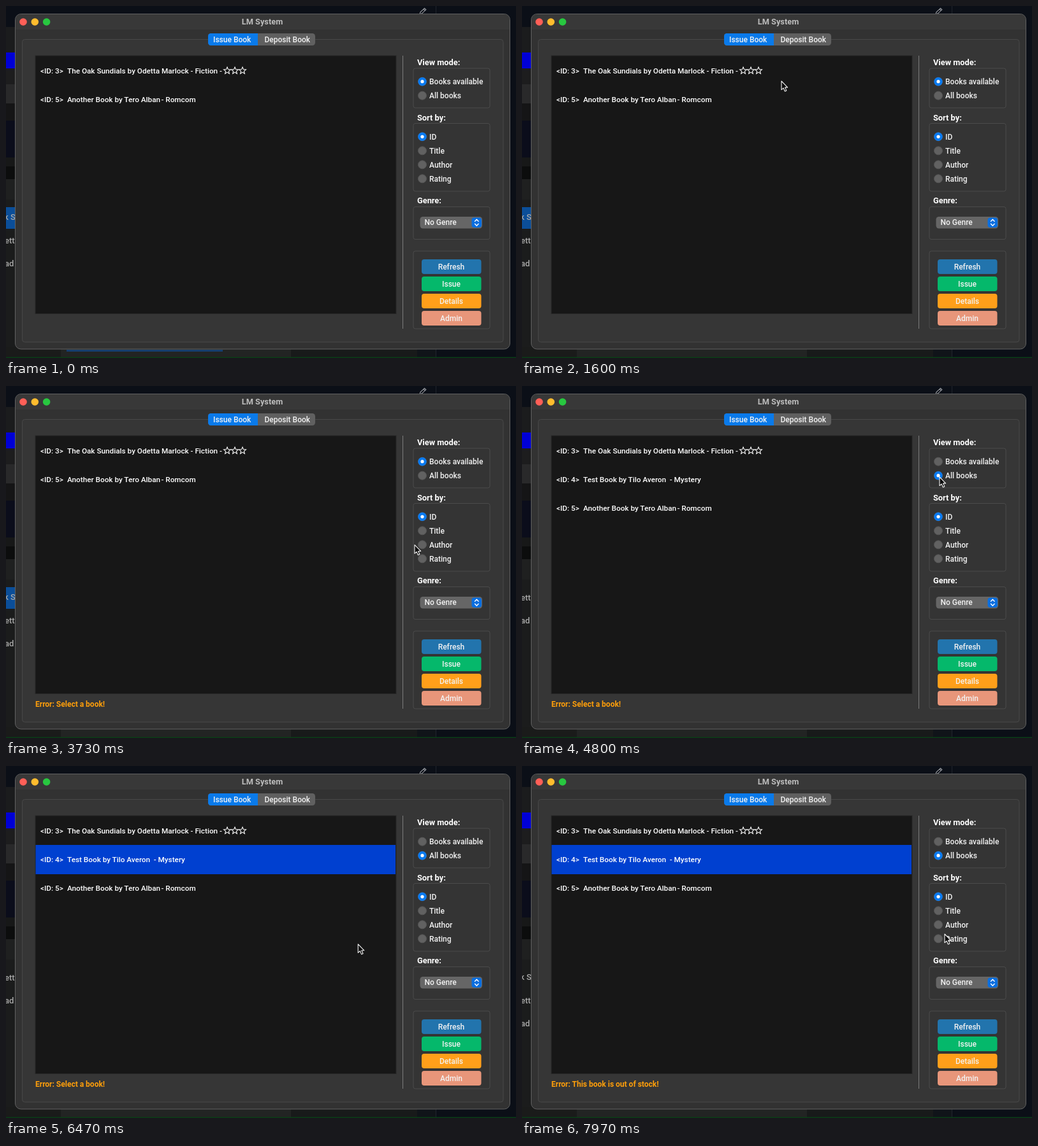
An HTML page for the animation above (8000 ms loop, 800 by 553 pixels).

```html
<!DOCTYPE html>
<html lang="en">
<head>
<meta charset="utf-8">
<title>LM System</title>
<style>
html, body { margin: 0; width: 100%; height: 100%; overflow: hidden; background: #0b0f17; }
svg { display: block; width: 800px; height: 553px; }
text { font-family: Roboto, Arial, sans-serif; font-size: 12px; font-weight: 500; fill: #f2f2f2; white-space: pre; }
.list text { font-size: 11.75px; fill: #fff; }
.head { font-size: 12.8px; font-weight: 700; fill: #fff; }
.error { font-weight: 700; fill: #ff9f0a; }
.mid { text-anchor: middle; }
.back text { font-size: 13px; fill: #a9a9a9; }
</style>
</head>
<body>
<svg id="stage" viewBox="0 0 800 553" xmlns="http://www.w3.org/2000/svg"></svg>
<script>
const LOOP = 8000;
const T = { line: 150, error: 3200, shift: 4370, all: 4670, stock: 7290, back: 7500 };

const rect = (x, y, x2, y2, fill, more = '') =>
  `<rect x="${x}" y="${y}" width="${x2 - x}" height="${y2 - y}" fill="${fill}" ${more}/>`;
const text = (x, yMid, s, more = '') =>
  `<text x="${x}" y="${yMid + 4.2}" ${more}>${s.replace(/</g, '&lt;').replace(/>/g, '&gt;')}</text>`;
const group = (id, body, more = '') => `<g id="${id}" ${more}>${body}</g>`;

const star = (cx, cy) => {
  const pts = Array.from({ length: 10 }, (_, i) => {
    const r = i % 2 ? 2.5 : 5.7, a = (i * 36 - 90) * Math.PI / 180;
    return (cx + r * Math.cos(a)).toFixed(2) + ',' + (cy + r * Math.sin(a)).toFixed(2);
  });
  return `<polygon points="${pts.join(' ')}" fill="none" stroke="#fff" stroke-width="1.1"/>`;
};

function backdrop() {
  const left = [
    [33, 73, '#1b1c1d'], [73, 98, '#0000d6'], [98, 123, '#1d1d1e'], [123, 153, '#29292a'],
    [153, 180, '#151516'], [180, 238, '#0b0d1b'], [238, 252, '#171818'], [252, 272, '#0c0d0d'],
    [272, 304, '#1f2020'], [304, 553, '#1b1c1c']
  ];
  return rect(0, 0, 800, 553, '#0b0f17')
    + rect(674, 0, 675, 553, '#20242c')
    + left.map(([a, b, c]) => rect(0, a, 20, b, c)).join('')
    + rect(0, 536, 86, 553, '#1a1b1a') + rect(86, 536, 447, 553, '#222423')
    + rect(447, 536, 645, 553, '#181a1a') + rect(645, 536, 674, 553, '#101419')
    + rect(0, 551.5, 800, 553, '#0a3d17')
    + group('line', rect(95, 540, 340, 543, '#163e6e'))
    + '<path d="M649 13l1-3.500 6.500-6 2.300 2.300-6.500 6zM655 5l2.300 2.300" fill="none" stroke="#9a9da2" stroke-width="1.1"/>'
    + group('focusRow', rect(0, 316, 20, 350, '#0b4e99'))
    + group('topName', text(-3, 332, 'k S'))
    + group('names', text(-2, 369, 'ett') + text(-2, 405, 'ad'));
}

function radio(id, y, label) {
  return `<circle cx="653" cy="${y}" r="6.500" fill="#616161" stroke="#555"/>`
    + group(id, `<circle cx="653" cy="${y}" r="6.700" fill="#0a7af0"/><circle cx="653" cy="${y}" r="2.600" fill="#fff"/>`)
    + text(664, y, label);
}

const panel = (y, y2) => rect(639, y, 759, y2, '#343434', 'rx="3" stroke="#4b4b4b"');
const button = (y, fill, label) =>
  rect(652, y, 745.5, y + 23, fill, 'rx="4"') + text(698.5, y + 11.5, label, 'class="mid"');

function book(id, y, num, title, dashX, genre) {
  return group(id, text(54, y, `<ID: ${num}>`) + text(96, y, title) + text(dashX, y, `- ${genre}`));
}

function appWindow() {
  const lights = ['#ff5f57', '#febc2e', '#28c840']
    .map((c, i) => `<circle cx="${27 + 18.3 * i}" cy="25" r="5.800" fill="${c}"/>`).join('');
  return rect(14.5, 12.5, 790.5, 539, '#323232', 'rx="9" stroke="#626262"')
    + '<path d="M15 37V21.500a8.500 8.500 0 0 1 8.500-8.500H781.500a8.500 8.500 0 0 1 8.500 8.500V37z" fill="#383838"/>'
    + lights + text(402, 25, 'LM System', 'class="head mid" style="fill:#bdbdbd"')
    + rect(25.5, 52.5, 780, 528, '#363636', 'rx="4" stroke="#484848"')
    + rect(317, 43, 485, 62, '#606060', 'rx="4.500"')
    + '<path d="M395 43H321.500a4.500 4.500 0 0 0-4.500 4.500v10a4.500 4.500 0 0 0 4.500 4.500H395z" fill="#0a7aea"/>'
    + text(354.7, 52.6, 'Issue Book', 'class="mid"') + text(441.3, 52.6, 'Deposit Book', 'class="mid"')
    + rect(46, 78, 612, 483.5, '#171717', 'stroke="#282828"')
    + '<rect id="mark" x="46.500" y="124" width="564.500" height="46"/>'
    + group('list',
        book('b3', 101.3, 3, 'The Oak Sundials by Odetta Marlock', 289.6, 'Fiction -')
        + [347, 359, 371].map(x => star(x, 101.6)).join('')
        + book('b4', 146.7, 4, 'Test Book by Tilo Averon', 231.8, 'Mystery')
        + book('b5', 146.7, 5, 'Another Book by Tero Alban', 243.5, 'Romcom'), 'class="list"')
    + '<text id="error" class="error" x="46" y="504.300"></text>'
    + rect(622, 78, 623, 507, '#7c7c7c')
    + text(645, 89, 'View mode:', 'class="head"') + panel(98, 160)
    + radio('available', 118.7, 'Books available') + radio('allBooks', 140.7, 'All books')
    + text(645, 175.5, 'Sort by:', 'class="head"') + panel(184.5, 291)
    + ['ID', 'Title', 'Author', 'Rating'].map((s, i) => radio('sort' + i, 205.3 + 22 * i, s)).join('')
    + text(645, 306, 'Genre:', 'class="head"') + panel(315.5, 366.5)
    + rect(649.5, 331, 747, 349.5, '#666', 'rx="4.500"') + text(656.5, 340.2, 'No Genre')
    + rect(730.5, 332.5, 746, 348, '#0a6fe0', 'rx="4"')
    + '<path d="M735.500 338.200l2.800-2.900 2.800 2.900M735.500 342.300l2.800 2.900 2.800-2.900" fill="none" stroke="#fff" stroke-width="1.400" stroke-linecap="round" stroke-linejoin="round"/>'
    + panel(385, 507)
    + button(398, '#2274ad', 'Refresh') + button(425, '#05b86b', 'Issue')
    + group('ring', rect(653, 426, 744.5, 447, 'none', 'rx="3" stroke="#0c8469" stroke-width="2"'))
    + button(452, '#ff9f1a', 'Details') + button(479, '#e8967a', 'Admin');
}

const pointer = group('pointer',
  '<path d="M0 0V13.600L3.100 10.800 5.400 16 7.800 14.900 5.600 9.900H9.600Z" fill="#0a0a0a" stroke="#f4f4f4" stroke-width="1.100" stroke-linejoin="round"/>');

document.getElementById('stage').innerHTML = group('back', backdrop(), 'class="back"') + appWindow() + pointer;
const $ = id => document.getElementById(id);
const show = (id, on) => $(id).setAttribute('visibility', on ? 'visible' : 'hidden');

// Pointer path: time, x, y
const path = [
  [30, 385, 553], [270, 375, 520], [430, 375, 520], [800, 392, 300], [1230, 407, 118],
  [1600, 407, 118], [2000, 560, 200], [2470, 651, 346], [2800, 683, 430], [3530, 683, 430],
  [3730, 641, 250], [4050, 646, 165], [4330, 655, 143], [5370, 655, 143], [5650, 540, 141],
  [5900, 443, 136], [6070, 428, 138], [6260, 428, 138], [6500, 570, 300], [6730, 683, 427],
  [7670, 683, 427], [7970, 663, 264]
];

const rate = (i, k) => (path[i + 1][k] - path[i][k]) / (path[i + 1][0] - path[i][0]);

// Slope that never overshoots its neighbours
function slope(i, k) {
  if (i === 0 || i === path.length - 1) return 0;
  const a = rate(i - 1, k), b = rate(i, k);
  return a * b <= 0 ? 0 : 2 * a * b / (a + b);
}

function pointerAt(t, k) {
  const last = path.length - 1;
  if (t <= path[0][0]) return path[0][k];
  if (t >= path[last][0]) return path[last][k];
  const i = path.findIndex(p => p[0] > t) - 1;
  const h = path[i + 1][0] - path[i][0], u = (t - path[i][0]) / h;
  const s = u * u * (3 - 2 * u);
  return path[i][k] * (1 - s) + path[i + 1][k] * s
    + h * u * (1 - u) * ((1 - u) * slope(i, k) - u * slope(i + 1, k));
}

function draw(t) {
  const x = pointerAt(t, 1), y = pointerAt(t, 2);
  $('pointer').setAttribute('transform', `translate(${x.toFixed(2)} ${y.toFixed(2)})`);
  show('pointer', t >= 30);

  const all = t >= T.all;
  show('available', !all);
  show('allBooks', all);
  for (let i = 0; i < 4; i++) show('sort' + i, i === 0);
  show('b4', all);
  $('b5').setAttribute('transform', `translate(0 ${all ? 45.5 : 0})`);

  const picked = t > 6260 && y > 170;
  const over = t > 5370 && x < 611 && y > 124 && y < 170;
  show('mark', picked || over);
  $('mark').setAttribute('fill', picked || t > 6700 ? '#0040d0' : '#ff6f61');

  show('ring', (t >= 2870 && t < 3570) || (t >= 6870 && t < 7720));
  $('error').textContent = t < T.error ? ''
    : t < T.stock ? 'Error: Select a book!' : 'Error: This book is out of stock!';

  const up = t >= T.shift && t < T.back;
  show('line', t < T.line);
  show('focusRow', t < T.shift);
  show('topName', !up);
  $('names').setAttribute('transform', `translate(0 ${up ? -36.5 : 0})`);
}

const start = performance.now();
function tick(now) {
  draw(Math.max(0, now - start) % LOOP);
  requestAnimationFrame(tick);
}
draw(0);
requestAnimationFrame(tick);
</script>
</body>
</html>
```
